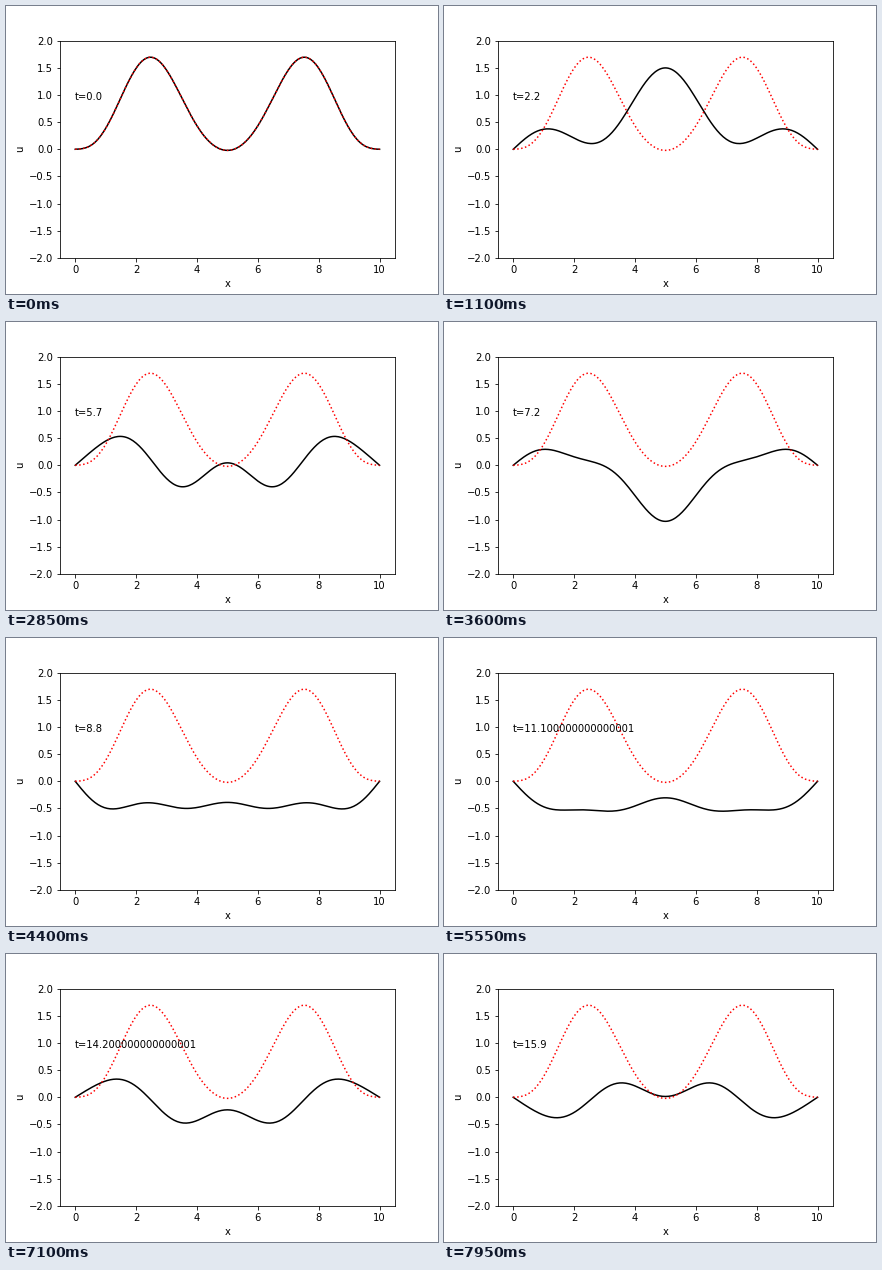
These frames come from a looping animation (432x288 px, 8 s). A matplotlib script:

```python
import numpy as np
import matplotlib.pyplot as plt
from matplotlib.animation import FuncAnimation

LENGTH = 10.0
DT = 0.1
STEPS = 160
DAMPING = 0.1

# Odd sine modes of the starting shape and their amplitudes
MODES = np.array([1, 3, 5, 7])
AMPS = np.array([1.03, 0.774, -0.433, -0.157])

x = np.linspace(0, LENGTH, 201)
k = MODES * np.pi / LENGTH
shapes = np.sin(np.outer(x, k))
half = DAMPING / 2
omega = np.sqrt(k**2 - half**2)


def wave(t):
    """Damped string released from rest with unit wave speed."""
    swing = np.cos(omega * t) + half / omega * np.sin(omega * t)
    return shapes @ (AMPS * np.exp(-half * t) * swing)


plt.rcParams.update({"font.family": "DejaVu Sans", "font.size": 10})
fig = plt.figure(figsize=(6, 4), dpi=72, facecolor="white")
fig.subplots_adjust(left=0.125, right=0.9, bottom=0.125, top=0.88)
ax = fig.add_subplot()
ax.set_ylim(-2, 2)
ax.set_xlabel("x")
ax.set_ylabel("u")

line, = ax.plot(x, wave(0), "k-", lw=1.5)
ax.plot(x, wave(0), "r:", lw=1.5)
ax.set_xlim(-0.05 * LENGTH, 1.05 * LENGTH)
label = ax.text(0, 0.9, "t=0.0")


def update(i):
    t = i * DT
    line.set_ydata(wave(t))
    label.set_text(f"t={t}")
    return line, label


anim = FuncAnimation(fig, update, frames=STEPS, interval=50,
                     repeat=True, repeat_delay=0, blit=False)
plt.show()
```
